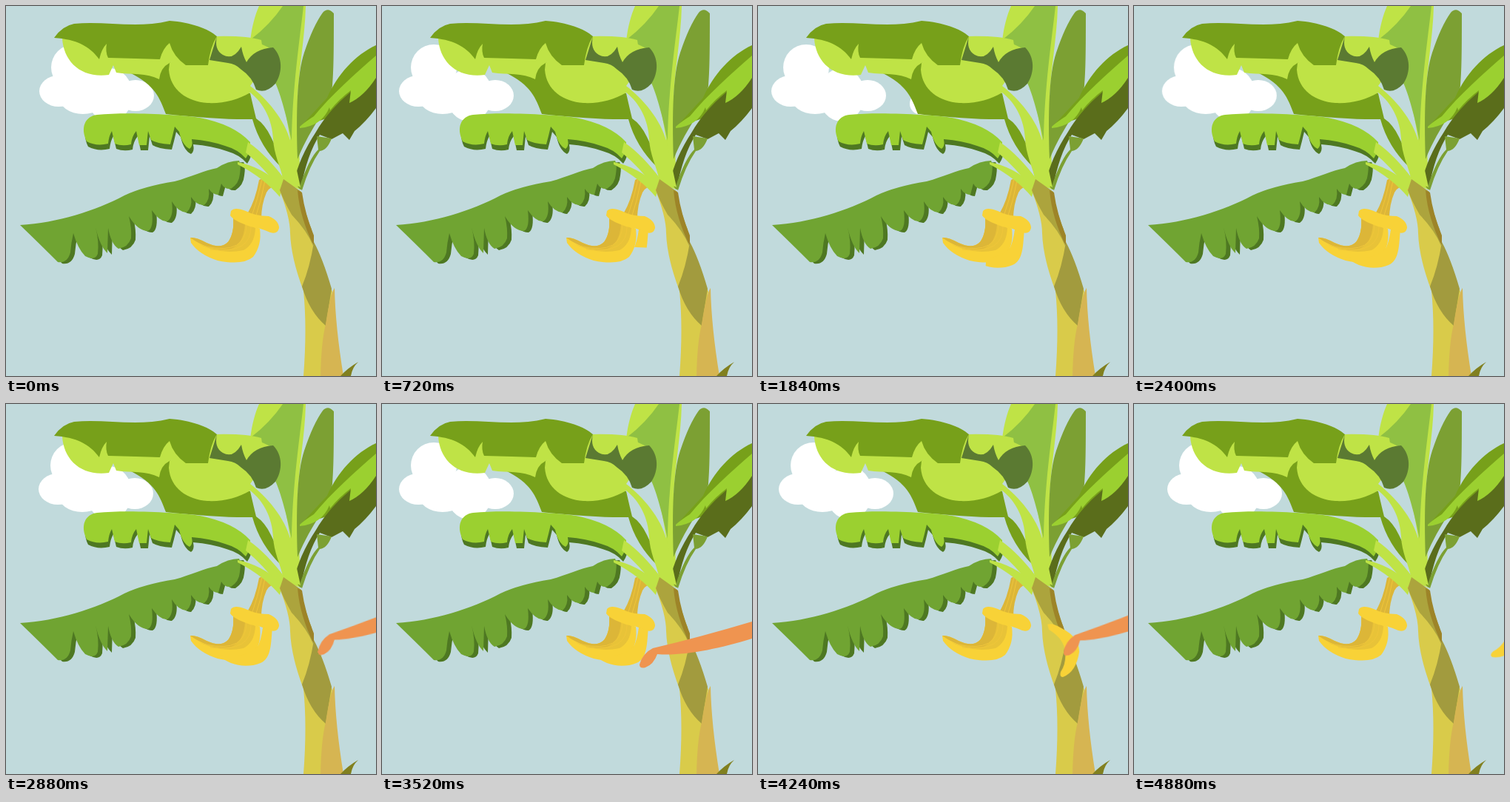
These frames come from a looping animation (500x500 px, 4.96 s). An HTML page without scripts:

```html
<!DOCTYPE html>
<html lang="en">
<head>
<meta charset="utf-8">
<title>Banana tree</title>
<style>
  html, body { margin: 0; width: 100%; height: 100%; overflow: hidden; background: #c1dadc; }
  svg { display: block; width: 100vw; height: 100vh; }
  .lime { fill: #bfe346; }
  .leaf { fill: #77a01a; }
  .bright { fill: #9bd030; }
  .fresh { fill: #8fc043; }
  .mid { fill: #70a432; }
  .shade { fill: #4e7822; }
  .olive { fill: #7ca033; }
  .moss { fill: #5a6d1b; }
  .yellow { fill: #f8d237; }
  .gold { fill: #dcb638; }
  .amber { fill: #e8c338; }
  .lines { fill: none; stroke: #f0c63a; stroke-width: 1; }

  #cloud, #puff, #grow, #ripe, #picked, #arm { animation: 4960ms linear infinite; }
  #cloud { fill: #fff; animation-name: drift; }
  #puff { fill: #fff; animation-name: peek; }
  #grow { stroke-dasharray: 100 200; animation-name: grow; }
  #ripe { animation-name: ripe; animation-timing-function: step-end; }
  #picked { transform-origin: 425px 328px; animation-name: carry; }
  #arm { transform-origin: 348px 356px; animation-name: reach; }

  @keyframes drift {
    0%, 100% { transform: none; }
    5.65% { transform: translateX(-5px); }
    11.29% { transform: translateX(-15px); }
    14.52% { transform: translateX(-22px); }
    22.58% { transform: translateX(-36px); }
    29.03% { transform: translateX(-44px); }
    33.87% { transform: translateX(-33px); }
    37.1% { transform: translateX(-27px); }
    45.16% { transform: translateX(-12px); }
    53.23% { transform: none; }
    58.06% { transform: translateX(-1px); }
    67.74% { transform: translateX(-15px); }
    70.97% { transform: translateX(-22px); }
    77.42% { transform: translateX(-33px); }
    79.03% { transform: translateX(-30px); }
    85.48% { transform: translateX(-17px); }
    90.32% { transform: translateX(-9px); }
    98.39% { transform: none; }
  }
  @keyframes peek {
    0%, 18%, 48%, 100% { transform: translateX(30px); }
    32% { transform: translateX(-4px); }
    37.1% { transform: none; }
  }
  @keyframes grow {
    0% { stroke-dashoffset: 100; }
    14.52% { stroke-dashoffset: 76; }
    22.58% { stroke-dashoffset: 64; }
    37.1% { stroke-dashoffset: 26; }
    45.16%, 100% { stroke-dashoffset: 0; }
  }
  @keyframes ripe {
    0% { visibility: visible; }
    72.58%, 100% { visibility: hidden; }
  }
  @keyframes carry {
    0%, 72.57% { visibility: hidden; transform: translate(-82px, 15px) rotate(50deg); }
    72.58% { visibility: visible; transform: translate(-82px, 15px) rotate(50deg); }
    79.03% { transform: translate(-38px, 12px) rotate(22deg); }
    85.48% { transform: none; }
    98.39%, 100% { visibility: visible; transform: translate(91px, -15px) rotate(30deg); }
  }
  @keyframes reach {
    0%, 48.39% { transform: translate(156px, -36px) rotate(-10deg); }
    58.06% { transform: translate(74px, -17px) rotate(-6deg); }
    69.35%, 72.58% { transform: none; }
    79.03% { transform: translate(30px, -7px) rotate(-3deg); }
    85.48% { transform: translate(65px, -16px) rotate(-6deg); }
    98.39%, 100% { transform: translate(166px, -40px) rotate(-12deg); }
  }
</style>
</head>
<body>
<svg viewBox="0 0 500 500" preserveAspectRatio="none">
  <defs>
    <mask id="growth" maskUnits="userSpaceOnUse" x="240" y="280" width="150" height="100">
      <path id="grow" d="M353 300V325C353 345 335 349 280 341" pathLength="100" fill="none" stroke="#fff" stroke-width="40"/>
    </mask>
    <path id="middle-blade" d="M109 183C100 164 107 149 123 147C165 143 235 147 262 151Q308 160 330 184Q331 196 324 206Q314 194 296 189Q276 182 251 180Q253 190 248 193Q238 188 234 170L228 163Q225 176 222 187Q204 186 196 181L192 169L190 188H180L176 169Q170 176 169 187Q157 190 147 186L143 169Q139 176 138 186Q122 190 109 183Z"/>
    <path id="lower-blade" d="M19 296C70 293 120 277 160 256Q185 244 228 237C250 231 268 222 285 219Q300 209 315 209Q318 214 316 227Q315 240 304 247Q295 248 291 240L287 255Q279 255 274 247Q276 262 268 269Q258 270 250 258Q252 272 244 279Q232 278 224 264Q227 285 218 291Q208 292 197 276Q200 300 192 304Q178 304 166 284Q170 300 169 314Q165 326 152 328Q142 322 138 300L137 334Q127 325 121 299Q126 318 124 335Q120 345 107 338Q97 328 91 307Q88 320 87 333Q83 348 70 346Q46 322 19 296Z"/>
  </defs>

  <g id="cloud">
    <ellipse cx="71" cy="115" rx="26" ry="21"/>
    <circle cx="92" cy="83" r="31"/>
    <ellipse cx="104" cy="122" rx="33" ry="24"/>
    <ellipse cx="140" cy="120" rx="31" ry="36"/>
    <ellipse cx="175" cy="121" rx="25" ry="21"/>
  </g>
  <circle id="puff" cx="220" cy="132" r="15"/>

  <g id="crown-leaves">
    <path class="lime" d="M330 48C332 28 337 11 342 0H405C404 45 395 85 394 130L398 248L376 240L370 215L384 180C376 125 362 78 350 62Z"/>
    <path class="fresh" d="M374 0H402C397 45 387 110 386 182C378 145 370 115 362 100Q376 72 357 57L331 45Q357 25 374 0Z"/>
    <path class="olive" d="M428 9Q435 1 443 10C443 50 443 85 441 108C437 140 414 158 394 207C392 145 393 93 403 63Q415 27 428 9Z"/>
    <path class="leaf" d="M500 53C472 66 448 92 434 124L398 163L440 150L500 85Z"/>
    <path class="moss" d="M419 170C440 135 470 110 500 92V138Q486 157 471 169L464 181L455 172L440 180L424 174Q407 200 398 248L389 238Q396 205 419 170Z"/>
    <path class="olive" d="M420 176L440 179Q434 195 424 196Q410 216 400 249L396 246Q410 205 422 194Z"/>
    <path class="bright" d="M397 163Q402 158 416 149C440 120 470 93 500 67V97Q484 122 464 131L466 114Q450 126 438 141L437 137Q427 162 397 165Z"/>
  </g>

  <g id="upper-leaf">
    <path class="leaf" d="M167 90L222 76L330 118Q335 140 338 152Q350 160 358 177L382 227L372 218Q343 190 333 153Q290 154 216 146C208 125 202 107 167 90Z"/>
    <path class="lime" d="M76 44C78 75 101 98 139 93L145 80L149 90C170 93 190 90 207 99Q209 83 221 77L235 70L220 45L130 45Z"/>
    <path class="lime" d="M221 77L250 58L283 41Q325 40 345 46L350 80L330 108C352 125 377 153 385 185L398 245L376 238C370 215 362 200 361 180C360 154 348 131 330 117C313 127 294 132 272 131C245 129 222 114 220 86Z"/>
    <path class="leaf" d="M65 43Q76 27 92 24C135 20 177 31 221 20C250 22 274 31 285 41Q276 55 273 80L243 80Q226 68 221 50Q212 57 208 72Q177 71 138 70Q134 62 136 51Q129 58 126 72C113 54 95 45 65 43Z"/>
    <path fill="#5b7a32" d="M285 41Q281 59 293 66Q307 74 318 55Q320 67 325 76Q335 58 361 56C374 69 374 90 364 105Q351 119 338 113Q333 96 318 86Q310 78 300 77L275 73Z"/>
  </g>

  <g id="banana-stem">
    <path class="gold" d="M342 235Q355 228 372 234L377 243Q357 241 352 252Q345 268 345 288L326 281Q337 263 342 235Z"/>
    <path class="lines" d="M346 234Q340 262 332 284M350 236Q345 263 337 286"/>
  </g>

  <g id="middle-leaf">
    <use class="shade" href="#middle-blade" x="2" y="7"/>
    <use class="bright" href="#middle-blade"/>
    <path class="lime" d="M327 184Q352 201 378 236L370 247Q348 218 324 198Z"/>
  </g>

  <g id="lower-leaf">
    <use class="shade" href="#lower-blade" x="6" y="2"/>
    <use class="mid" href="#lower-blade"/>
    <path class="lime" d="M313 211Q345 217 374 243L370 258Q348 232 313 214Z"/>
  </g>

  <g id="trunk">
    <path fill="#d9cb4a" d="M369 247L386 248L408 305L418 330L441 386L432 445L425 500H402Q407 435 402 385Q385 340 384 307Q384 285 369 247Z"/>
    <path fill="#aca43d" d="M375 234L399 251Q402 275 413 302L415 324Q407 304 386 282Q375 263 370 249Z"/>
    <path fill="#9d8428" d="M394 249L400 252Q404 281 416 310V324Q397 286 394 249Z"/>
    <path fill="#a29b3e" d="M416 319Q428 341 440 382L432 432Q410 413 400 379Q411 352 416 319Z"/>
    <path fill="#d6b552" d="M444 381Q445 433 456 500H425Q426 454 432 430Q438 390 444 381Z"/>
    <path fill="#81801f" d="M476 481Q468 488 466 500H452Q462 489 476 481Z"/>
  </g>

  <g id="bunch">
    <path class="yellow" d="M249 313Q257 312 271 320Q290 329 300 319Q309 307 307 284L343 301Q346 323 334 339Q320 351 286 344Q261 336 250 320Z"/>
    <path class="amber" d="M253 318Q285 335 301 318Q309 306 307 288L337 300Q336 322 321 330Q287 337 253 318Z"/>
    <path class="gold" d="M249 313Q257 312 271 320Q290 329 300 319Q309 307 307 284L323 293Q322 321 304 328Q275 332 249 313Z"/>
    <path class="lines" d="M270 325Q325 337 325 294M276 329Q333 336 331 296"/>
    <g id="ripe">
      <path class="yellow" mask="url(#growth)" d="M347 302H360C358 322 359 344 344 350C324 358 302 353 286 339C315 344 333 337 341 326Q345 317 347 302Z"/>
    </g>
    <path class="yellow" d="M304 277Q309 271 324 277Q337 284 355 284Q369 290 369 300Q367 309 357 306Q344 300 330 298Q307 290 303 283Z"/>
  </g>

  <path id="picked" class="yellow" d="M391 298Q397 295 410 303Q434 315 434 335Q430 362 412 369Q407 369 409 362Q418 348 414 330Q411 316 393 305Z"/>
  <path id="arm" fill="#ef9450" d="M348 352Q352 337 366 330Q430 315 500 294L680 235V280L500 317C455 331 405 341 372 338Q367 352 356 356Q348 358 348 352Z"/>
</svg>
</body>
</html>
```
